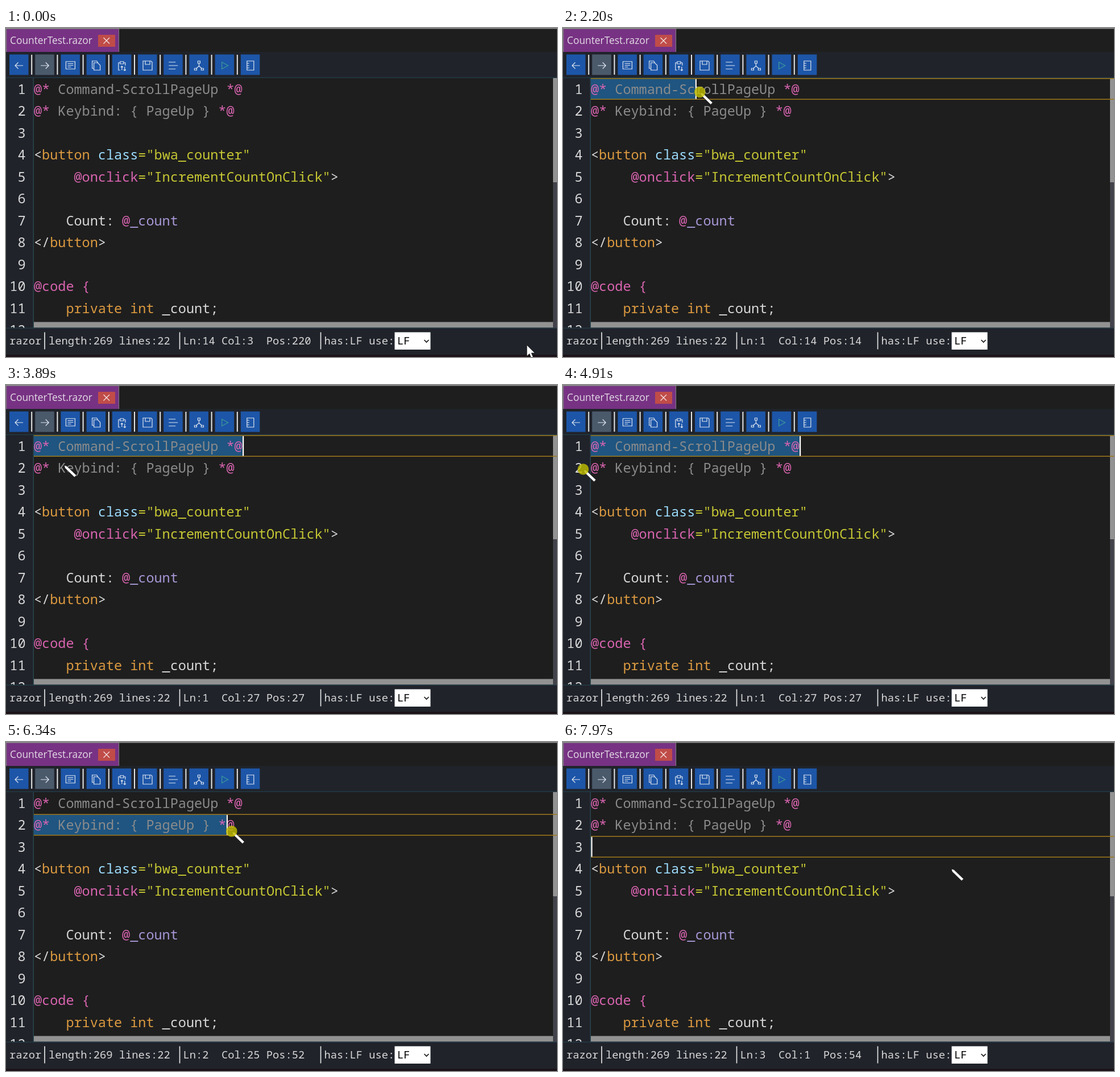
An HTML page for the animation above (8000 ms loop, 969 by 578 pixels).

```html
<!DOCTYPE html>
<html lang="en">
<head>
<meta charset="utf-8">
<title>Code editor</title>
<style>
  html, body { margin: 0; width: 100%; height: 100%; overflow: hidden; background: #20232a; }
  svg { display: block; width: 969px; height: 578px; }
  text { white-space: pre; fill: #d8d8d8; font: 23.5px "Noto Sans Mono", "DejaVu Sans Mono", monospace; }
  .small text { font-size: 18.75px; }
  #title { font: 17.35px "Open Sans", "Noto Sans", sans-serif; fill: #e4dce6; }
  .pink { fill: #d964b0; }
  .note { fill: #8b8b8b; }
  .tag { fill: #dc9a40; }
  .attr { fill: #9cdcfe; }
  .str { fill: #c6c733; }
  .var { fill: #a797d6; }
  .icon { fill: none; stroke: #dfe6f0; stroke-width: 1.2; }
</style>
</head>
<body>
<svg viewBox="0 0 969 578">
  <rect width="969" height="578" fill="#20232a"/>
  <rect width="969" height="42" fill="#1e1e1e"/>
  <rect width="969" height="1.5" fill="#8f8f92"/>
  <path d="M.7 42V1.500H198.500V42" fill="#773283" stroke="#80767f" stroke-width="1.200"/>
  <text id="title" x="7" y="27.700">CounterTest.razor</text>
  <rect x="162" y="12" width="30" height="21" fill="#c04c48"/>
  <path d="M171.500 17l10.500 10.500m0-10.500l-10.500 10.500" stroke="#f2dede" stroke-width="1.400"/>
  <g id="tools"></g>

  <rect y="86.500" width="969" height="1.500" fill="#223a45"/>
  <rect x="49" y="88" width="913" height="429" fill="#1e1e1e"/>
  <rect x="47.500" y="88" width="1.500" height="439" fill="#2a444e"/>
  <rect x="962" y="88" width="7" height="439" fill="#42424a"/>
  <rect x="962" y="88" width="7" height="183" fill="#929292"/>
  <rect id="select" x="49" height="36" fill="#1f5580"/>
  <g id="code"></g>
  <path id="row" d="M49 .8H969M49 37.300H969" stroke="#a07a1c" stroke-width="1.600"/>
  <rect id="caret" width="2.200" height="35" fill="#fff"/>
  <rect x="49" y="516.500" width="913" height="10" fill="#929292"/>

  <g class="small">
    <rect y="527" width="969" height="51" fill="#20232a"/>
    <rect y="526.500" width="969" height="1.500" fill="#223a45"/>
    <rect y="574" width="969" height="4" fill="#1b1318"/>
    <path d="M68 534.500v30M305.500 534.500v30M553.500 534.500v30" stroke="#e4e4e4" stroke-width="1.700"/>
    <text x="6" y="556">razor</text>
    <text x="75" y="556">length:269 lines:22</text>
    <text id="status" x="311.500" y="556"></text>
    <text x="559.500" y="556">has:LF use:</text>
    <rect x="683.500" y="534.500" width="63" height="30.500" fill="#fff"/>
    <text x="688" y="556" style="fill:#000">LF</text>
    <path d="M735.500 548l4 4 4-4" fill="none" stroke="#111" stroke-width="1.600"/>
  </g>

  <g id="mouse">
    <path id="arrow" d="M0 0V19.500L4.500 15.300 7.600 22.500 11 21 8 14H14Z" fill="#fff" stroke="#111" stroke-width=".7"/>
    <path id="pen" d="M1 1L5.500 2.300 22.500 18.500 19 22 2.300 5.800Z" fill="#fff" stroke="#111" stroke-width=".7"/>
    <circle id="press" r="9.800" fill="#c0bc00" opacity=".82"/>
  </g>
</svg>
<script>
const $ = id => document.getElementById(id);
const LEFT = 49, TOP = 88, CHAR = 14.1, LINE = 38.5;
const rowY = n => TOP + (n - 1) * LINE;

// Toolbar icons, drawn around the centre of each button
const icons = [
  'M7 0H-7M-1.500-5.500L-7 0L-1.500 5.500',
  'M-7 0H7M1.500-5.500L7 0L1.500 5.500',
  'M-8-7H8V6H-8ZM-5-3.500H5M-5-.5H5M-5 2.500H1',
  'M-4-5H2.500L7-.5V8H-4ZM-4 5H-7V-8H1L3-5',
  'M-3 8H-6V-5H-3M3-5H6V0M-3-3V-7H3V-3ZM0 8V1M-2 3L0 1L2 3M5 2V9M3 7L5 9L7 7',
  'M-8-8H6L8-6V8H-8ZM-4-8V-2H4V-8',
  'M-8-6H4M-8 0H8M-8 6H4',
  'M-2-8H2V-4H-2ZM0-4V1L-5 5M0 1L5 5M-8 5H-4V8H-8ZM4 5H8V8H4Z',
  'M-5-6L6 0L-5 6Z',
  'M-6-8H6V8H-6ZM-6-4H-2M-6 0H-2M-6 4H-2'
];
$('tools').innerHTML = icons.map((d, i) => {
  const x = 6 + i * 45.2;
  const line = i ? `<path d="M${x - 6} 47v35" stroke="#e6e6e6" stroke-width="2"/>` : '';
  return `${line}<rect x="${x}" y="46.500" width="33.500" height="36" fill="${i == 1 ? '#4b5a6b' : '#1d56a8'}"/>
    <path class="icon" transform="translate(${x + 17} 66)" d="${d}"${i == 8 ? ' style="stroke:#3c9a98"' : ''}/>`;
}).join('');

// Source lines as class|text tokens
const lines = [
  ['pink|@*', 'note| Command-ScrollPageUp ', 'pink|*@'],
  ['pink|@*', 'note| Keybind: { PageUp } ', 'pink|*@'],
  [],
  ['|<', 'tag|button', 'attr| class', 'str|="bwa_counter"'],
  ['pink|     @onclick', 'str|="IncrementCountOnClick"', '|>'],
  [],
  ['|    Count: ', 'pink|@', 'var|_count'],
  ['|</', 'tag|button', '|>'],
  [],
  ['pink|@code {'],
  ['tag|    private int', '| _count;'],
  []
];
const escape = s => s.replace(/</g, '&lt;');
$('code').innerHTML = lines.map((tokens, i) => {
  const y = 115.8 + i * LINE;
  const spans = tokens.map(token => {
    const [kind, words] = token.split('|');
    return `<tspan class="${kind}">${escape(words)}</tspan>`;
  }).join('');
  return `<text x="34.500" y="${y}" text-anchor="end">${i + 1}</text><text x="${LEFT}" y="${y}">${spans}</text>`;
}).join('');

// Pointer path: time, x, y
const path = [
  [0, 916, 557], [30, 916, 557], [830, 182, 187], [1380, 42, 111], [1560, 41, 111],
  [2340, 284, 113], [3010, 418, 115], [3140, 424, 115], [3220, 424, 115],
  [4030, 61, 144], [4380, 35.5, 148], [4910, 35.5, 148], [5710, 201, 150.5],
  [5780, 230, 151], [6550, 430, 160], [7230, 468, 187], [7580, 468, 187],
  [7970, 682, 222], [8000, 682, 222]
];
const slope = (i, k) => path[i + 1] && path[i]
  ? (path[i + 1][k] - path[i][k]) / (path[i + 1][0] - path[i][0]) : 0;
// Harmonic mean keeps the curve free of overshoot
const tangent = (i, k) => {
  const a = slope(i - 1, k), b = slope(i, k);
  return a * b > 0 ? 2 * a * b / (a + b) : 0;
};
function pointer(t, k) {
  let i = 0;
  while (i < path.length - 2 && t >= path[i + 1][0]) i++;
  const h = path[i + 1][0] - path[i][0], u = (t - path[i][0]) / h, v = 1 - u;
  return path[i][k] * (1 + 2 * u) * v * v + path[i + 1][k] * (3 - 2 * u) * u * u
    + h * u * v * (tangent(i, k) * v - tangent(i + 1, k) * u);
}

const within = (t, a, b) => t >= a && t < b;
const show = (id, on) => $(id).setAttribute('visibility', on ? 'visible' : 'hidden');
const set = (id, name, value) => $(id).setAttribute(name, value);

function draw(t) {
  const x = pointer(t, 1), y = pointer(t, 2);
  // The editor reacts to a press slightly after the click mark appears
  const row = t < 1640 ? 14 : t < 4960 ? 1 : t < 7370 ? 2 : 3;
  const length = [0, 26, 25, 0][row] || 0;
  const selecting = within(t, 1640, 3270) || within(t, 4960, 6620);
  const reach = Math.floor((x - LEFT) / CHAR);
  const chars = selecting ? Math.max(0, Math.min(length, reach)) : length;
  const col = row == 14 ? 3 : chars + 1;
  const pos = row == 14 ? 220 : [0, 0, 27, 53][row] + col;

  const top = rowY(row), visible = row < 12;
  show('row', visible);
  show('select', visible);
  show('caret', visible && !within(t, 4210, 4710));
  set('row', 'transform', `translate(0 ${top})`);
  set('select', 'y', top + 1.3);
  set('select', 'width', chars * CHAR);
  set('caret', 'x', LEFT + chars * CHAR + .4);
  set('caret', 'y', top + 1.7);
  $('status').textContent = `Ln:${row}`.padEnd(6) + `Col:${col}`.padEnd(7) + `Pos:${pos}`;

  set('mouse', 'transform', `translate(${x} ${y})`);
  show('arrow', y > 527);
  show('pen', y <= 527);
  show('press', within(t, 1580, 3270) || within(t, 4910, 6620) || within(t, 7370, 7430));
}

const start = performance.now();
function tick() {
  draw((performance.now() - start) % 8000);
  requestAnimationFrame(tick);
}
tick();
</script>
</body>
</html>
```
